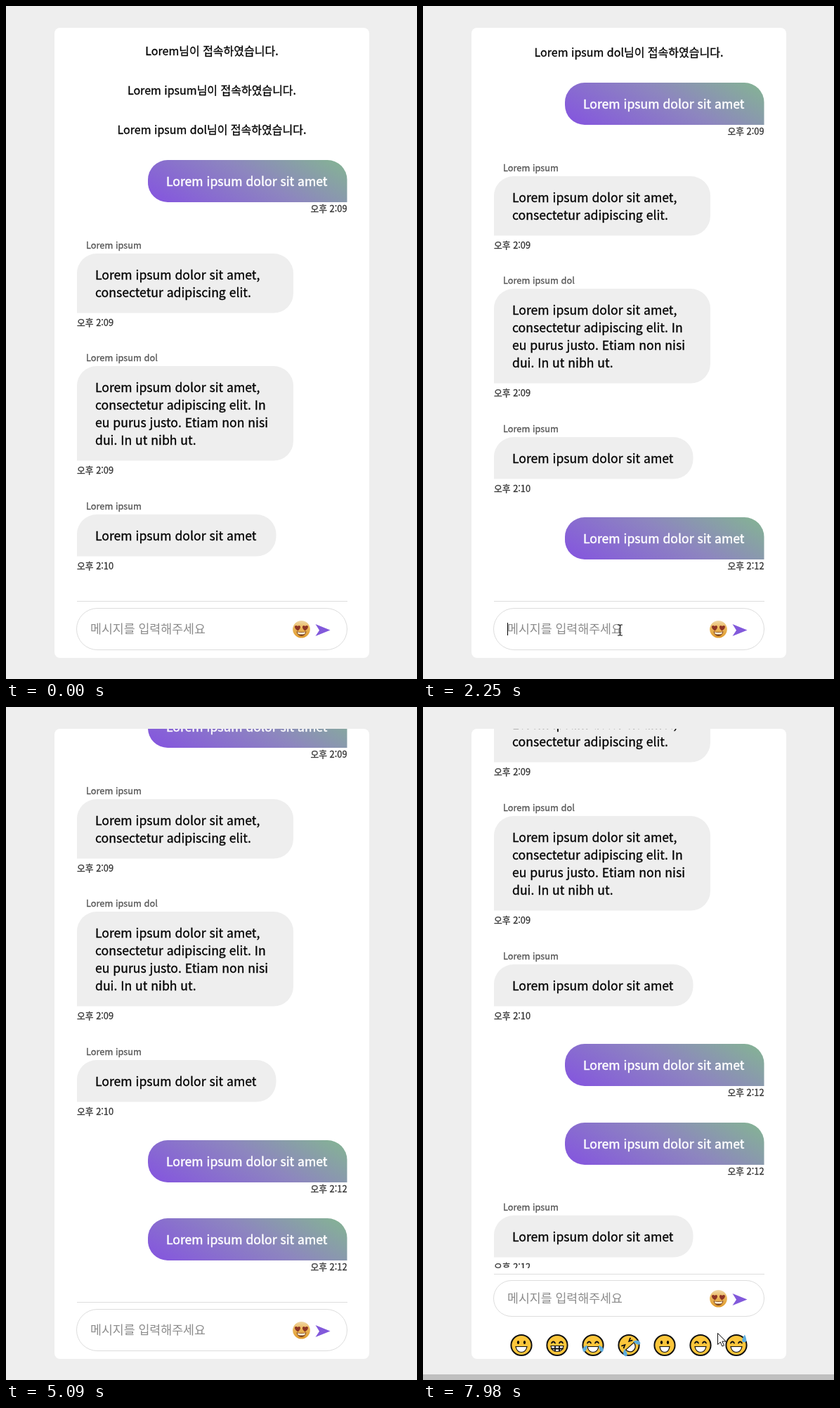
Write an HTML page that moves like this. It is 585 px wide and 957 px high and loops after 8000 ms.

```html
<!DOCTYPE html>
<html lang="ko">
<head>
<meta charset="utf-8">
<title>Chat</title>
<style>
  html, body { margin: 0; width: 100%; height: 100%; overflow: hidden; background: #eee; }
  svg { display: block; width: 585px; height: 957px; }
  text { font-family: "Noto Sans CJK KR", "Noto Sans CJK", "Noto Sans CJK JP", sans-serif; fill: currentColor; white-space: pre; }
  .medium text { font-weight: 500; }
  .thicken .medium text { stroke: currentColor; stroke-width: .3px; }
  .notice { font-size: 16px; text-anchor: middle; color: #000; }
  .body { font-size: 17.6px; color: #000; }
  .medium .sent .body { color: #fff; stroke: #fff; stroke-width: .45px; }
  .name, .time { font-size: 12.8px; }
  .name { color: #555; }
  .time { color: #333; }
  .sent .time { text-anchor: end; }
  #hint { font-size: 17.3px; color: #8c8c8c; }
  #typed { font: 15.84px "Liberation Sans", Arial, sans-serif; color: #000; }
</style>
</head>
<body>
<svg id="stage" viewBox="0 0 585 957">
  <defs>
    <linearGradient id="sentFill" gradientUnits="userSpaceOnUse" x1="93" y1="113.6" x2="190" y2="-53.6">
      <stop offset="0" stop-color="#8453e0"/>
      <stop offset=".55" stop-color="#8d86bf"/>
      <stop offset=".95" stop-color="#85b097"/>
    </linearGradient>
    <linearGradient id="iconFill" x2="0" y2="1">
      <stop offset="0" stop-color="#f0d9a8"/>
      <stop offset=".4" stop-color="#eab75c"/>
      <stop offset="1" stop-color="#e09a2c"/>
    </linearGradient>
    <clipPath id="listClip"><rect id="listArea" x="69" y="31" width="448" height="807"/></clipPath>
    <clipPath id="cardClip"><rect x="69" y="31" width="448" height="896" rx="8"/></clipPath>
  </defs>
  <rect width="585" height="957" fill="#eee"/>
  <rect x="69" y="31" width="448" height="896" rx="8" fill="#fff"/>
  <g clip-path="url(#listClip)" class="medium"><g id="notices"></g><g id="messages"></g></g>
  <rect id="rule" x="101" y="846" width="385" height="1" fill="#ddd"/>
  <rect id="field" x="100.5" y="856.5" width="385" height="59" rx="29.5" fill="#fff" stroke="#ddd"/>
  <g id="fieldContent">
    <text id="hint" x="120" y="892">메시지를 입력해주세요</text>
    <text id="typed" x="120" y="891">Lorem ipsum dolor sit amet</text>
    <rect id="caret" y="877" width="1" height="18"/>
    <g transform="translate(420.5 886.3)">
      <circle r="12.3" fill="url(#iconFill)"/>
      <path d="M-5 2.2C-13-3-8.5-7.4-5.3-4.2C-2.5-7.6 1.5-3-5 2.2ZM5 2.2C13-3 8.5-7.4 5.3-4.2C2.5-7.6-1.5-3 5 2.2Z" fill="#8e3524"/>
      <path d="M-7 3Q0 5 7 3Q5.5 9.6 0 9.6T-7 3Z" fill="#7a3f1c"/>
      <path d="M-5.8 4Q0 5.6 5.8 4L4.6 6.6Q0 8-4.6 6.6Z" fill="#fff3d8"/>
    </g>
    <path d="M440.5 879L461.5 887.5L440.5 896L446 887.8Z" fill="#8259db"/>
  </g>
  <g clip-path="url(#cardClip)"><g id="emojis"></g></g>
  <rect id="bottomBar" width="585" height="8" fill="#bfbfbf"/>
  <path id="arrow" d="M0 0V16L3.8 12.6L6.4 18.5L9 17.4L6.4 11.6H11.6Z" fill="#fff" stroke="#111"/>
  <path id="beam" d="M-3.5-7.5H-1L0-6.5L1-7.5H3.5M0-6.5V6.5M-3.5 7.5H-1L0 6.5L1 7.5H3.5" fill="none" stroke="#111" stroke-width="1.2"/>
</svg>
<script>
const LOOP = 8000;
const $ = id => document.getElementById(id);
const set = (id, attrs) => { for (const k in attrs) $(id).setAttribute(k, attrs[k]); };
const show = (id, on) => set(id, { visibility: on ? 'visible' : 'hidden' });
const clamp = v => Math.max(0, Math.min(1, v));
const easeInOut = p => p < .5 ? 4 * p ** 3 : 1 - 4 * (1 - p) ** 3;
const smooth = p => p * p * (3 - 2 * p);

// Some systems lack the medium weight; thicken the regular one there.
const pen = document.createElement('canvas').getContext('2d');
const family = getComputedStyle($('hint')).fontFamily;
const textWidth = weight => {
  pen.font = `${weight} 100px ${family}`;
  return pen.measureText('Lorem ipsum').width;
};
if (textWidth(400) === textWidth(500)) $('stage').classList.add('thicken');

const SHORT = ['Lorem ipsum dolor sit amet'];
const LONG = ['Lorem ipsum dolor sit amet,', 'consectetur adipiscing elit.'];
const LONGER = [LONG[0], LONG[1] + ' In', 'eu purus justo. Etiam non nisi', 'dui. In ut nibh ut.'];

const messages = [
  { y: 219, lines: SHORT, time: '2:09' },
  { y: 351.6, lines: LONG, time: '2:09', name: 'Lorem ipsum', w: 308 },
  { y: 512, lines: LONGER, time: '2:09', name: 'Lorem ipsum dol', w: 308 },
  { y: 723, lines: SHORT, time: '2:10', name: 'Lorem ipsum' },
  { y: 836.8, lines: SHORT, time: '2:12', at: 1830, scroll: 110 },
  { y: 948.2, lines: SHORT, time: '2:12', at: 3690, scroll: 221 },
  { y: 1080.5, lines: SHORT, time: '2:12', name: 'Lorem ipsum', at: 5880, scroll: 357.4 },
];

// Rounded everywhere except the lower corner on the speaker's side.
function bubblePath(w, h, sent, r = 28) {
  const arc = (x, y) => `a${r} ${r} 0 0 1 ${x} ${y}`;
  return `M0 ${r}${arc(r, -r)}H${w - r}${arc(r, r)}` +
    (sent ? `V${h}H${r}${arc(-r, -r)}Z` : `V${h - r}${arc(-r, r)}H0Z`);
}

function messageMarkup({ lines, time, name, w = 283.5 }, i) {
  const sent = !name, h = (sent ? 35 : 34.6) + 25 * lines.length;
  const body = lines.map((line, n) => `<text class="body" x="26" y="${37 + 25 * n}">${line}</text>`).join('');
  return `<g id="message${i}" class="${sent ? 'sent' : ''}">
    ${sent ? '' : `<text class="name" x="13" y="-7">${name}</text>`}
    <path d="${bubblePath(w, h, sent)}" fill="${sent ? 'url(#sentFill)' : '#eee'}"/>${body}
    <text class="time" x="${sent ? w : 0}" y="${Math.round(h) + (sent ? 14 : 18)}">오후 ${time}</text></g>`;
}

$('notices').innerHTML = ['Lorem', 'Lorem ipsum', 'Lorem ipsum dol'].map((who, i) =>
  `<text class="notice" x="293" y="${70 + 56 * i}">${who}님이 접속하였습니다.</text>`).join('');
$('messages').innerHTML = messages.map(messageMarkup).join('');

const line = d => `<path d="${d}" fill="none" stroke="#111" stroke-width="1.8" stroke-linecap="round"/>`;
const shape = (d, fill) => `<path d="${d}" fill="${fill}" stroke="#111" stroke-width="1.2"/>`;
const dotEyes = '<ellipse cx="-4.5" cy="-4" rx="1.6" ry="2.5"/><ellipse cx="4.5" cy="-4" rx="1.6" ry="2.5"/>';
const happyEyes = line('M-8-3Q-5.5-7-3-3M3-3Q5.5-7 8-3');
const mouth = shape('M-8 2H8Q6.5 10 0 10T-8 2Z', '#fff');
const tears = '<path d="M-8 0Q-17 3-14 9Q-9 11-8 0ZM8 0Q17 3 14 9Q9 11 8 0Z" fill="#5cadde"/>';
const faces = [
  dotEyes + mouth,
  happyEyes + shape('M-9 1H9Q8 9 0 9T-9 1Z', '#fff') + line('M-8 5H8M-3 2V8M3 2V8'),
  happyEyes + mouth + tears,
  `<g transform="rotate(-42)">${line('M-8-6L-4-4L-8-2M8-6L4-4L8-2') + mouth + tears}</g>`,
  dotEyes + shape('M-7 2H7Q6 10 0 10T-7 2Z', '#fff'),
  happyEyes + mouth,
  happyEyes + mouth + '<path d="M12-15Q5-5 11-4Q17-4 12-15Z" fill="#5cadde"/>',
];
$('emojis').innerHTML = faces.map((face, i) =>
  `<g transform="translate(${140 + 51 * i} 0)"><circle r="14.6" fill="#fcc63b" stroke="#111" stroke-width="2"/>${face}</g>`).join('');

// Pointer paths: [time, x, y]
const entering = [[200, 576, 654], [330, 480, 740], [480, 330, 850], [600, 283, 885], [730, 280.5, 887.5], [4270, 280.5, 887.5]];
const returning = [[6560, 533, 690], [6680, 418, 738], [6840, 179, 790], [6960, 250, 826],
  [7090, 393.5, 832.5], [7340, 419.5, 872], [7470, 419.5, 872], [7980, 419.5, 890.5], [LOOP, 419.5, 890.5]];

function along(path, t) {
  const i = path.findIndex(point => point[0] > t);
  if (i < 1) return null;
  const [t0, x0, y0] = path[i - 1], [t1, x1, y1] = path[i], p = (t - t0) / (t1 - t0);
  return [x0 + (x1 - x0) * p, y0 + (y1 - y0) * p];
}

// Visible caret spans: [from, to, x]
const caretSpans = [[610, 1140, 120], [1180, 1690, 311], [2220, 2730, 120],
  [2970, 3490, 311], [4000, 4510, 120], [5020, 5090, 120]];

function drawList(t) {
  const ages = messages.map(({ at }) => at ? t - at : LOOP);
  const drops = ages.map(age => 38.5 * (1 - easeInOut(clamp(age / 490))));
  const last = ages.findLastIndex(age => age >= 0);
  // A dropping message overflows the list and pushes the scroll further.
  const scroll = (messages[last].scroll || 0) + Math.max(0, drops[last] - 32.2);

  messages.forEach(({ y, name }, i) => set('message' + i, {
    transform: `translate(${name ? 101 : 202} ${Math.round(y + drops[i] - scroll)})`,
    opacity: ages[i] < 0 ? 0 : clamp(.03 + ages[i] / 290),
  }));
  set('notices', { transform: `translate(0 ${-Math.round(scroll)})` });
}

function drawInput(t) {
  const typing = t >= 1180 && t < 1830 || t >= 2970 && t < 3690;
  show('hint', !typing);
  show('typed', typing);
  const caret = caretSpans.find(([from, to]) => t >= from && t < to);
  show('caret', caret);
  if (caret) set('caret', { x: caret[2] });

  const open = smooth(clamp((t - 7470) / 510));
  set('listArea', { height: 807 - 40 * open });
  set('rule', { y: 846 - 40 * open });
  set('field', { y: 856.5 - 41 * open, height: 59 - 8 * open, rx: 29.5 - 4 * open });
  set('fieldContent', { transform: `translate(0 ${-45 * open})` });
  set('emojis', { transform: `translate(0 ${955 - 47.5 * open})` });
  set('bottomBar', { y: 957 - 8 * open });
}

function drawPointer(t) {
  const first = along(entering, t), spot = first || along(returning, t);
  const overField = first && first[1] > 857;
  show('beam', overField);
  show('arrow', spot && !overField);
  if (spot) set(overField ? 'beam' : 'arrow', { transform: `translate(${spot})` });
}

const start = performance.now();
function frame() {
  const t = (performance.now() - start) % LOOP;
  drawList(t);
  drawInput(t);
  drawPointer(t);
  requestAnimationFrame(frame);
}
frame();
</script>
</body>
</html>
```
